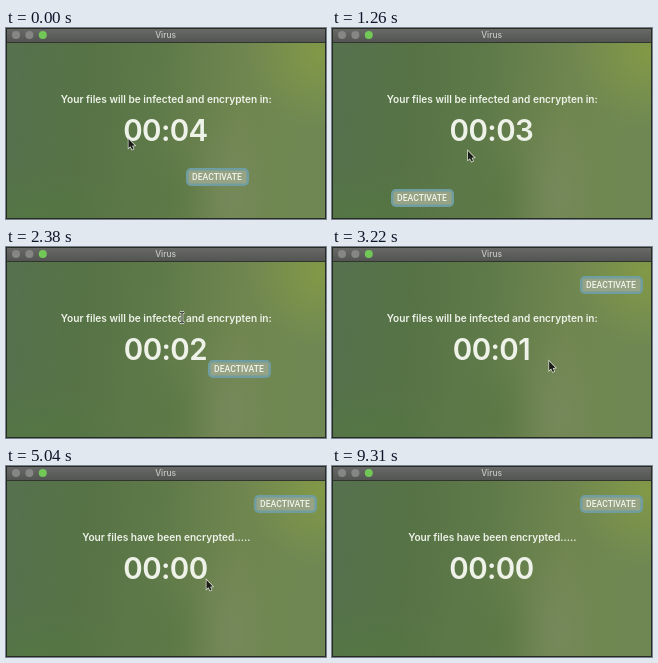
Recreate the animation shown at these times as an HTML page with a canvas. Size 320 px wide and 191 px high, loop 9.38 s.

```html
<!DOCTYPE html>
<html lang="en">
<head>
<meta charset="utf-8">
<title>Virus</title>
<style>
  html, body { margin: 0; width: 100%; height: 100%; overflow: hidden; background: #222; }
  canvas { display: block; }
</style>
</head>
<body>
<canvas id="stage" width="320" height="191"></canvas>
<script>
const W = 320, H = 191, LOOP = 9380, STEP = 70;
const BW = 63, BH = 18;
const ctx = document.getElementById('stage').getContext('2d');

// The button sits at x, y until the pointer catches it.
const buttons = [
  { x: 180, y: 140, caught: 1050 },
  { x: 59, y: 161, caught: 1750 },
  { x: 202, y: 113, caught: 3010 },
  { x: 248, y: 29, caught: Infinity }
];

// Places the pointer passes, with an optional pause, besides each catch.
const stops = [
  { t: 0, x: 122.5, y: 111 },
  { t: 1260, x: 136, y: 123 },
  { t: 2380, x: 176, y: 70 },
  { t: 3780, x: 144, y: 80 },
  { t: 5040, x: 200.5, y: 114, stay: 210 },
  { t: 5390, x: 220, y: 140, stay: 2030 },
  { t: 7980, x: 234, y: 193 },
  ...buttons.slice(0, -1).map(b => ({ t: b.caught, x: b.x + BW / 2, y: b.y + BH / 2 }))
].sort((a, b) => a.t - b.t);

function pointerAt(t) {
  const i = stops.findLastIndex(s => s.t <= t);
  const a = stops[i], b = stops[i + 1] || a;
  const from = a.t + (a.stay || 0);
  const u = Math.max(0, (t - from) / (b.t - from || 1));
  const k = b === a ? 0 : u * u * (3 - 2 * u);
  return [a.x + (b.x - a.x) * k, a.y + (b.y - a.y) * k];
}

function linear(x0, y0, x1, y1, ...colors) {
  const g = ctx.createLinearGradient(x0, y0, x1, y1);
  colors.forEach((c, i) => g.addColorStop(i / (colors.length - 1), c));
  return g;
}

function rect(fill, x, y, w, h) {
  ctx.fillStyle = fill;
  ctx.fillRect(x, y, w, h);
}

function box(fill, x, y, w, h, r) {
  ctx.beginPath();
  ctx.roundRect(x, y, w, h, r);
  ctx.fillStyle = fill;
  ctx.fill();
}

function blob(x, y, rx, ry, rgb, alpha) {
  ctx.save();
  ctx.translate(x, y);
  ctx.scale(rx, ry);
  const g = ctx.createRadialGradient(0, 0, 0, 0, 0, 1);
  g.addColorStop(0, `rgba(${rgb},${alpha})`);
  g.addColorStop(1, `rgba(${rgb},0)`);
  rect(g, -1, -1, 2, 2);
  ctx.restore();
}

function text(str, x, y, font, color, spacing = 0) {
  ctx.font = font;
  ctx.letterSpacing = spacing + 'px';
  ctx.fillStyle = color;
  ctx.textAlign = 'center';
  ctx.fillText(str, x, y);
}

function drawWindow() {
  rect(linear(0, 0, W, 30, '#55714f', '#567346', '#5f7a49', '#708650', '#6f8853'), 0, 0, W, H);
  blob(315, 25, 75, 75, '138,160,66', .7);
  blob(225, 165, 45, 90, '122,138,98', .55);
  blob(20, 185, 110, 50, '84,120,64', .6);
  blob(165, 170, 45, 60, '82,114,62', .4);

  rect(linear(0, 0, 0, 14, '#6a6b69', '#535552'), 0, 0, W, 14);
  rect('#30352d', 0, 14, W, 1);
  ['#868785', '#868785', '#72c857'].forEach((color, i) => box(color, 6 + i * 13.4, 3, 8, 8, 4));
  text('Virus', 159.6, 10.3, '500 8.4px Inter, sans-serif', '#c6c8c4');

  ctx.strokeStyle = '#262b23';
  ctx.lineWidth = 1;
  ctx.strokeRect(.5, .5, W - 1, H - 1);
}

function drawButton({ x, y }) {
  box('#6f9da0', x, y, BW, BH, 5);
  box('#96a384', x + 2.5, y + 2.5, BW - 5, BH - 5, 2);
  text('DEACTIVATE', x + 31, y + 12, '500 8.6px Roboto, sans-serif', '#f3f5ec');
}

function drawArrow(x, y) {
  ctx.beginPath();
  [[0, 0], [0, 9], [2, 7.2], [3.6, 10.6], [5, 10], [3.6, 6.7], [6.3, 6.4]]
    .forEach(([dx, dy]) => ctx.lineTo(x + dx, y + dy));
  ctx.closePath();
  ctx.lineWidth = 1.4;
  ctx.strokeStyle = '#dfe4da';
  ctx.stroke();
  ctx.fillStyle = '#1a1d18';
  ctx.fill();
}

function drawBeam(x, y) {
  for (const [width, color] of [[2.6, '#dde3d8'], [1, '#20251d']]) {
    ctx.lineWidth = width;
    ctx.strokeStyle = color;
    ctx.beginPath();
    ctx.moveTo(x, y - 4);
    ctx.lineTo(x, y + 5);
    for (const [end, tip] of [[-4, -5], [5, 6]]) {
      ctx.moveTo(x - 2.5, y + tip);
      ctx.lineTo(x, y + end);
      ctx.lineTo(x + 2.5, y + tip);
    }
    ctx.stroke();
  }
}

function draw(t) {
  const left = Math.max(0, 4 - Math.floor((t + 400) / 1000));
  const message = left ? 'Your files will be infected and encrypten in:' : 'Your files have been encrypted.....';
  drawWindow();
  text(message, 160.3, 75.3, '600 10.15px Inter, sans-serif', '#eef2e9');
  text('00:0' + left, 159.4, 113.2, '600 29.5px Inter, sans-serif', '#eef2e9', -.6);
  drawButton(buttons.find(b => t < b.caught));
  const [x, y] = pointerAt(t);
  const overText = Math.abs(y - 71) < 7 && Math.abs(x - 160) < 106;
  (overText ? drawBeam : drawArrow)(x, y);
}

const start = performance.now();
function tick() {
  const t = (performance.now() - start) % LOOP;
  draw(Math.floor(t / STEP) * STEP);
  requestAnimationFrame(tick);
}
tick();
</script>
</body>
</html>
```
